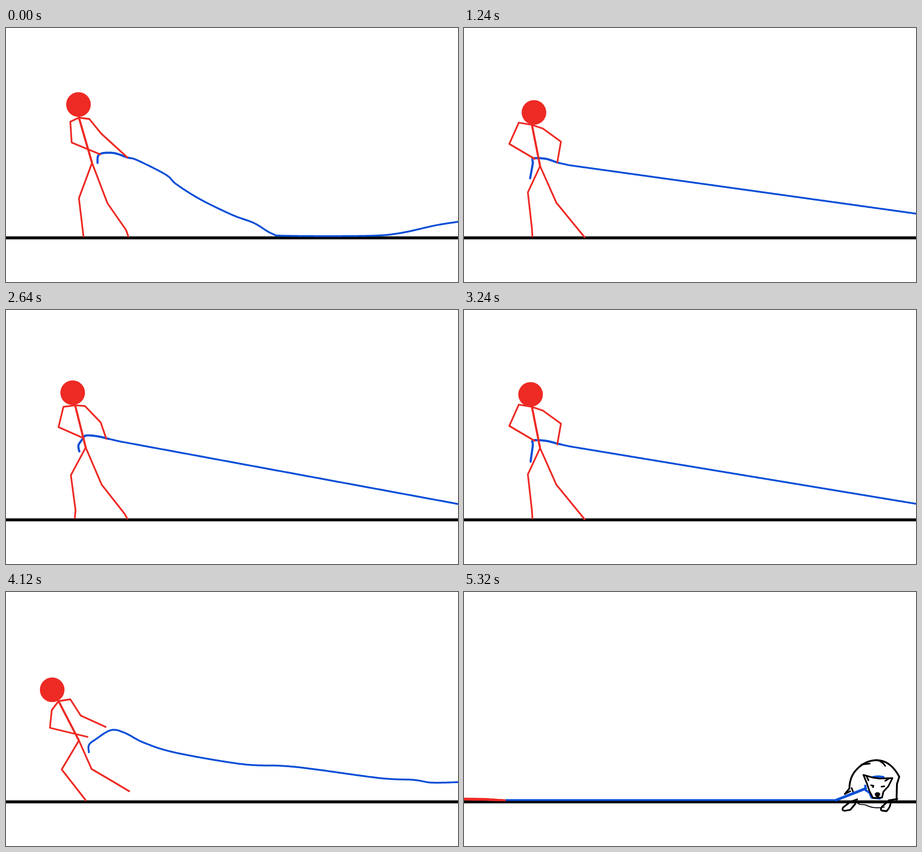
Recreate the animation shown at these times as an HTML page with a canvas. Size 998 px wide and 561 px high, loop 5440 ms.

```html
<!DOCTYPE html>
<html lang="en">
<head>
<meta charset="utf-8">
<title>Tug on the leash</title>
<style>
html, body { margin: 0; width: 100%; height: 100%; overflow: hidden; background: #fff; }
canvas { display: block; width: 100vw; height: 100vh; }
</style>
</head>
<body>
<canvas id="stage" width="998" height="561"></canvas>
<script>
const ctx = document.getElementById('stage').getContext('2d');
const LOOP = 5440, W = 998, H = 561;
const RED = '#ee2a24', BLUE = '#0a4fd8', BLACK = '#000';
const FLOOR = 463.5, ROPE_FLOOR = 459.5;
const LETS_GO = 3920, DOG_IN = 4720, DOG_WALK = 600;

const pairs = list => Array.from({ length: list.length / 2 }, (_, i) => list.slice(2 * i, 2 * i + 2));
const mix = (a, b, k) => a.map((v, i) => v + (b[i] - v) * k);
const add = ([x, y], dx, dy) => [x + dx, y + dy];

// Catmull-Rom curve through a few key points.
function smooth(points, detail = 10) {
  const out = [], at = i => points[Math.max(0, Math.min(points.length - 1, i))];
  for (let i = 0; i < points.length - 1; i++) {
    const [a, b, c, d] = [at(i - 1), at(i), at(i + 1), at(i + 2)];
    for (let s = 0; s < detail; s++) {
      const u = s / detail;
      out.push(b.map((v, j) => v + u / 2 * (c[j] - a[j]
        + u * (2 * a[j] - 5 * v + 4 * c[j] - d[j] + u * (3 * (v - c[j]) + d[j] - a[j])))));
    }
  }
  return [...out, at(points.length - 1)];
}

// Evenly spaced points along a line, so any two ropes can be blended.
function resample(points, count = 220) {
  const marks = [0];
  for (let i = 1; i < points.length; i++) {
    const [a, b] = [points[i - 1], points[i]];
    marks.push(marks[i - 1] + Math.hypot(b[0] - a[0], b[1] - a[1]));
  }
  let s = 1;
  return Array.from({ length: count }, (_, i) => {
    const d = marks.at(-1) * i / (count - 1);
    while (s < points.length - 1 && marks[s] < d) s++;
    return mix(points[s - 1], points[s], (d - marks[s - 1]) / (marks[s] - marks[s - 1]));
  });
}

const slackRope = list => resample(smooth(pairs(list)));

// A tail hangs from the left hand; past the right hand the rope runs straight.
function tautRope(left, right, tail, bow, endY) {
  const hold = add(left, -4, -1), middle = add(mix(left, right, 0.5), 0, bow);
  const grip = [add(left, ...tail), add(hold, 0, 10), hold, middle, right, add(right, 26, 6)];
  return resample([...smooth(grip), [W, endY]]);
}

// core: head, neck, hip. arms: shoulder, elbow, hand. legs: knee, ankle, foot.
function pose(core, armL, armR, legL, legR, rope) {
  const p = { core, armL, armR, legL, legR };
  for (const part in p) p[part] = pairs(p[part]);
  p.rope = rope(p.armL[2], p.armR[2]);
  return p;
}

const ready = pose([160, 169, 161, 198, 190, 298],
  [142, 207, 145, 253, 208, 279], [184, 201, 210, 233, 268, 286],
  [161, 376, 169, 443, 171, 460], [224, 387, 265, 446, 270, 460],
  () => slackRope([202, 298, 206, 279, 237, 276, 268, 286, 290, 292, 353, 324, 376, 345,
    430, 379, 500, 413, 548, 431, 587, 454, 620, 459, 800, 459, 870, 453, 948, 436, 998, 428]));

const pull = pose([147.5, 178, 156, 206, 186, 302],
  [134, 220, 136, 262, 180, 271], [175, 200, 203, 245, 241, 269],
  [146, 367, 158, 442, 153, 459], [220, 385, 266, 447, 270, 459],
  (l, r) => tautRope(l, r, [1, 13], -6, 429));

const brace = pose([154.5, 186.5, 150, 214, 168, 305],
  [121, 209, 100, 256, 156, 289], [174, 222, 214, 251, 206, 297],
  [141, 363, 150, 443, 151, 460], [204, 386, 258, 452, 266, 462],
  (l, r) => tautRope(l, r, [-10, 43], -4, 410));

const strain = {
  ...brace,
  core: [add(brace.core[0], -7.5, 0), ...brace.core.slice(1)],
  rope: tautRope(brace.armL[2], add(brace.armR[2], 0, -2), [-9, 46], -3, 428)
};

const crouch = pose([154.5, 205, 162, 234, 176, 330],
  [136, 246, 135, 290, 182, 304], [193, 243, 220, 270, 233, 303],
  [140, 376, 150, 446, 152, 460], [207, 397, 267, 447, 273, 460],
  (l, r) => tautRope(l, r, [1, 42], 4, 423));

const slip = pose([102, 216, 116, 241, 161, 328],
  [101, 261, 97, 300, 180, 320], [142, 237, 165, 273, 220, 298],
  [123, 392, 166, 447, 176, 460], [189, 391, 230, 415, 272, 440],
  () => slackRope([183, 354, 183, 338, 197, 326, 232, 305, 262, 311, 305, 333, 375, 355,
    520, 380, 610, 384, 678, 391, 825, 411, 900, 415, 940, 421, 998, 420]));

const flatArm = [-30, 456, 45, 457, 90, 460], flatLeg = [45, 459, 65, 459.5, 90, 460];
const lie = pose([-80, 432, -50, 452, 0, 458], flatArm, flatArm, flatLeg, flatLeg,
  () => resample([[92, ROPE_FLOOR], [W, ROPE_FLOOR]]));

const keys = [
  [0, ready], [280, pull], [840, pull], [1080, brace], [1400, brace], [1640, crouch],
  [2000, crouch], [2120, pull], [2440, pull], [2800, strain], [3760, strain],
  [4000, slip], [4120, slip], [4520, lie], [LOOP, lie]
];

// Each heave swings the upper body out and back: start, end, dx, dy.
const heaves = [
  [0, 280, 1, -9], [280, 600, -3, 2], [600, 1080, -6, 4], [1240, 1560, 2, 8],
  [1560, 2000, -6, 0], [2000, 2600, -10, -14], [2640, 3240, 3, 8], [3240, 4120, 4, 18]
];

// The drawing changes in short runs: first change, last change, how many.
const steps = [
  [0, 0, 1], [80, 280, 3], [520, 1000, 7], [1080, 1560, 7], [1640, 1840, 3], [2000, 2120, 2],
  [2280, 2360, 2], [2520, 2640, 2], [2800, 3240, 5], [3400, 3760, 4], [3920, 4440, 6],
  [4520, 4520, 1], [4720, 5200, 5], [5320, 5320, 1]
].flatMap(([from, to, n]) => Array.from({ length: n }, (_, i) =>
  Math.round((from + (to - from) * i / Math.max(1, n - 1)) / 40) * 40));

// Shifts the upper body; the feet and the far end of the rope stay put.
function lean(p, dx, dy) {
  const shift = (points, weight) => points.map((q, i) => {
    const w = weight(i, q[0]);
    return add(q, dx * w, dy * w);
  });
  const all = () => 1, leg = i => i ? 0 : 0.25;
  return {
    core: shift(p.core, i => i < 2 ? 1 : 0.6),
    armL: shift(p.armL, all), armR: shift(p.armR, all),
    legL: shift(p.legL, leg), legR: shift(p.legR, leg),
    rope: shift(p.rope, (i, x) => Math.min(1, (W - x) / (W - 260)))
  };
}

function poseAt(t) {
  const i = keys.findLastIndex(key => key[0] <= t);
  const [t0, a] = keys[i], [t1, b] = keys[i + 1];
  const k = (t - t0) / (t1 - t0), p = {};
  for (const part in a) p[part] = a[part].map((q, j) => mix(q, b[part][j], k));
  const heave = heaves.find(([from, to]) => from <= t && t < to);
  if (!heave) return p;
  const [from, to, dx, dy] = heave, swing = Math.sin(Math.PI * (t - from) / (to - from));
  return lean(p, dx * swing, dy * swing);
}

function line(points, color, width) {
  ctx.beginPath();
  points.forEach(q => ctx.lineTo(...q));
  ctx.strokeStyle = color;
  ctx.lineWidth = width;
  ctx.stroke();
}

function drawMan({ core: [head, neck, hip], armL, armR, legL, legR }) {
  line([neck, hip], RED, 4.6);
  for (const arm of [armL, armR]) line([neck, ...arm], RED, 3.8);
  for (const leg of [legL, legR]) line([hip, ...leg], RED, 3.8);
  ctx.beginPath();
  ctx.arc(...head, 27.2, 0, 7);
  ctx.fillStyle = RED;
  ctx.fill();
}

function shape(d, width, stroke = BLACK, fill) {
  const path = new Path2D(d);
  if (fill) {
    ctx.fillStyle = fill;
    ctx.fill(path);
  }
  ctx.strokeStyle = stroke;
  ctx.lineWidth = width;
  ctx.stroke(path);
}

function drawDog(dx) {
  ctx.save();
  ctx.translate(dx, 0);
  // back and belly
  shape('M841 446L851 434Q851 405 872 387T918 372Q944 376 961 408L956 424L955 459', 4);
  shape('M878 381L896 379M911 371Q924 374 930 384M841 446L853 440M856 433L859 441M938 460L957 457', 3.4);
  shape('M864 462L873 469L886 470Q905 480 928 475', 2.2);
  // paws
  shape('M868 458L852 464L837 476Q833 484 842 483L853 481L864 468', 3.8);
  shape('M939 460L924 473Q917 482 924 483L933 484Q941 476 942 466', 3.8);
  // leash and collar
  shape(`M822 ${ROPE_FLOOR}L887 434`, 6, BLUE);
  shape('M886 428L887 438L895 443L900 454L918 456M903 409Q915 406 926 409', 5, BLUE);
  // face
  shape('M890 424L882 404L903 410L917 412L946 411L937 429L926 441L923 454L903 455L895 439Z', 3.6, BLACK, '#fff');
  shape('M889 407L893 416M930 417L937 413M922 430L928 429M899 427L904 428L903 431', 3.6);
  shape('M908 446Q913 441 918 446L915 452L910 451Z', 2.6, BLACK, BLACK);
  ctx.restore();
}

function draw(t) {
  const step = steps.findLast(s => s <= t), p = poseAt(step);
  const hasDog = step >= DOG_IN;
  const dogX = 120 * (1 - Math.min(1, (step - DOG_IN) / DOG_WALK)) ** 3;
  const ropeEnd = hasDog ? 826 + dogX : W;
  ctx.fillStyle = '#fff';
  ctx.fillRect(0, 0, W, H);
  ctx.lineCap = ctx.lineJoin = 'round';
  line([[-9, FLOOR], [W + 9, FLOOR]], BLACK, 6.4);
  line(p.rope.filter(q => q[0] <= ropeEnd), BLUE, 4);
  if (step < LETS_GO) line(p.rope.filter(q => q[0] < p.armR[2][0] + 8), BLUE, 4.6);
  drawMan(p);
  if (hasDog) drawDog(dogX);
}

const start = performance.now();
function tick() {
  draw((performance.now() - start) % LOOP);
  requestAnimationFrame(tick);
}
tick();
</script>
</body>
</html>
```
